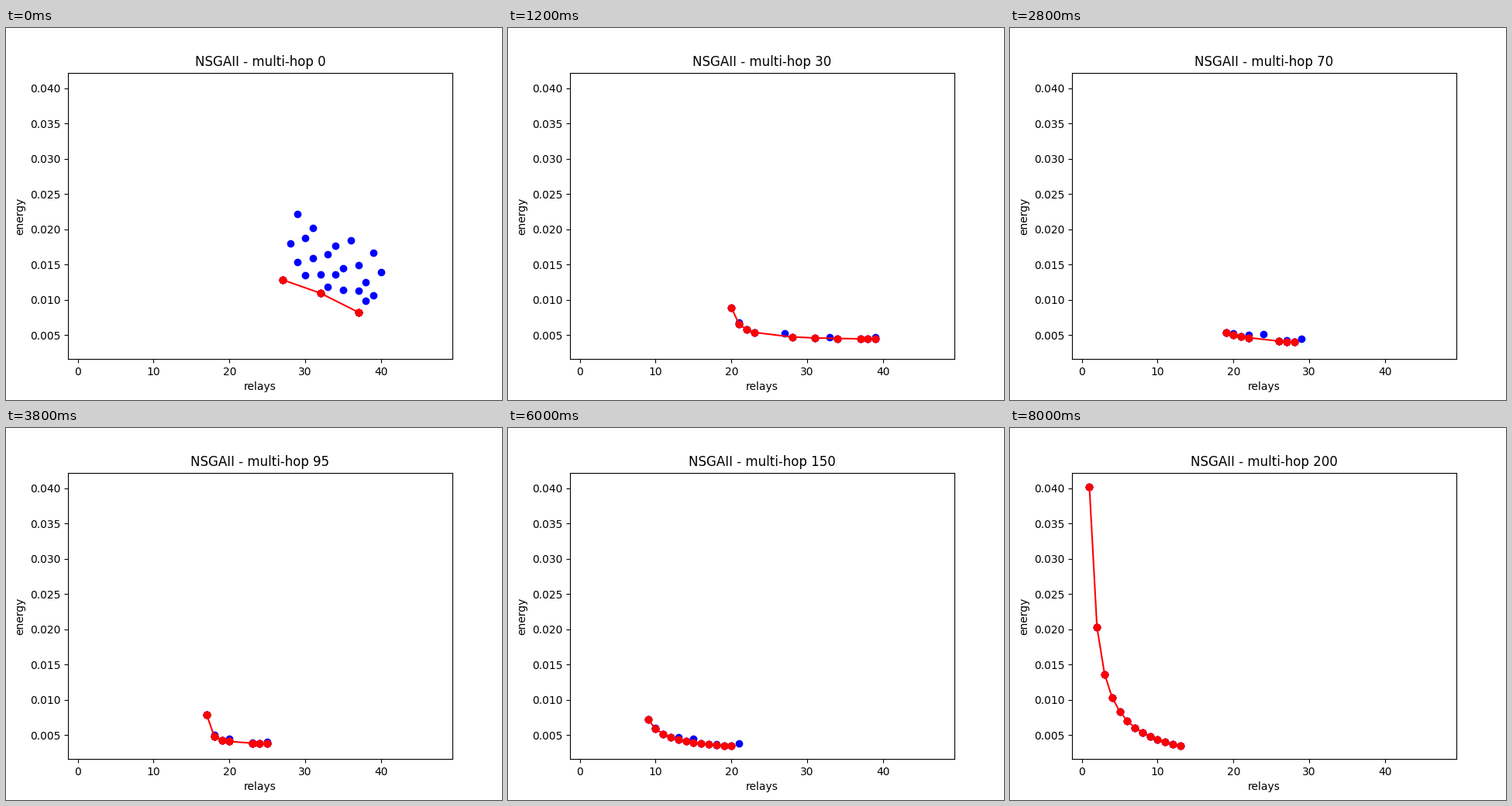
These frames come from a looping animation (640x480 px, 8200 ms). A matplotlib script:

```python
import numpy as np
import matplotlib.pyplot as plt
from matplotlib.animation import FuncAnimation

STEPS, POP, GENS = 41, 32, 5
GOLDEN = 0.618034

# Front over time: first and last relay count, energy (1e-4) at both ends,
# sharpness of the bend, spread of the dominated solutions
KEYS = np.array([
    # step, lo, hi, head, tail, bend, spread
    (0, 27, 37, 128.5, 82.5, -0.03, 90),
    (6, 20, 39, 89, 44.5, 1, 4),
    (14, 19, 28, 54, 40, 0.15, 8),
    (19, 17, 25, 79, 38, 2.5, 4),
    (26, 16, 24, 60, 35, 0.8, 0),
    (30, 9, 20, 72, 34.5, 0.4, 6),
    (35, 1, 14, 402, 34.5, 1, 25),
    (40, 1, 13, 402, 34.5, 1, 0),
])


def state(step):
    t, lo, hi, head, *rest = KEYS.T
    lo, hi, inv, *rest = (np.interp(step, t, c) for c in (lo, hi, 1 / head, *rest))
    return np.rint(lo), np.rint(hi), 1 / inv, *rest


def front(step, lo, hi, head, tail, bend, spread):
    """Hyperbola from head to tail, with gaps until the search converges."""
    x = np.arange(lo, hi + 1)
    d = x - lo
    g = 1 / (1 + bend * d)
    y = tail + (head - tail) * (g - g[-1]) / (1 - g[-1])
    if spread > 50:
        keep = d % 5 == 0
    elif step < 30:
        keep = (d < 4) | (hi - x < 3) | ((d > 5) & (d % 3 == 2))
    else:
        keep = d >= 0
    return x[keep], y[keep]


def dominated(x, y, spread):
    """Evenly spread relay counts at quasi-random heights above the front."""
    count = int(min(spread, 4 + spread / 5))
    q = np.arange(count, 0, -1) * GOLDEN % 1
    bx = np.rint(np.linspace(x[0] + 1, x[-1] + min(3, spread / 10), count))
    return bx, np.interp(bx, x, y) + spread * (0.15 + q ** 1.5)


fig, ax = plt.subplots(figsize=(6.4, 4.8), dpi=100)
ax.set(xlim=(-1.297, 49.419), ylim=(0.001604, 0.04222),
       xlabel="relays", ylabel="energy")
ax.set_xticks(range(0, 50, 10))
ax.set_yticks(np.arange(1, 9) * 0.005)
population, = ax.plot([], [], "bo")
best, = ax.plot([], [], "ro-")
title = ax.set_title("")


def draw(step):
    now = state(step)
    x, y = front(step, *now)
    bx, by = dominated(x, y, now[-1])
    copies = max(1, (POP - len(bx)) // len(x))
    x, y = np.repeat(x, copies), np.repeat(y, copies)
    population.set_data(np.append(bx, x), np.append(by, y) * 1e-4)
    best.set_data(x, y * 1e-4)
    title.set_text(f"NSGAII - multi-hop {step * GENS}")
    return population, best, title


anim = FuncAnimation(fig, draw, frames=STEPS, init_func=lambda: draw(0),
                     interval=200, repeat=True, repeat_delay=0, blit=False)
plt.show()
```
